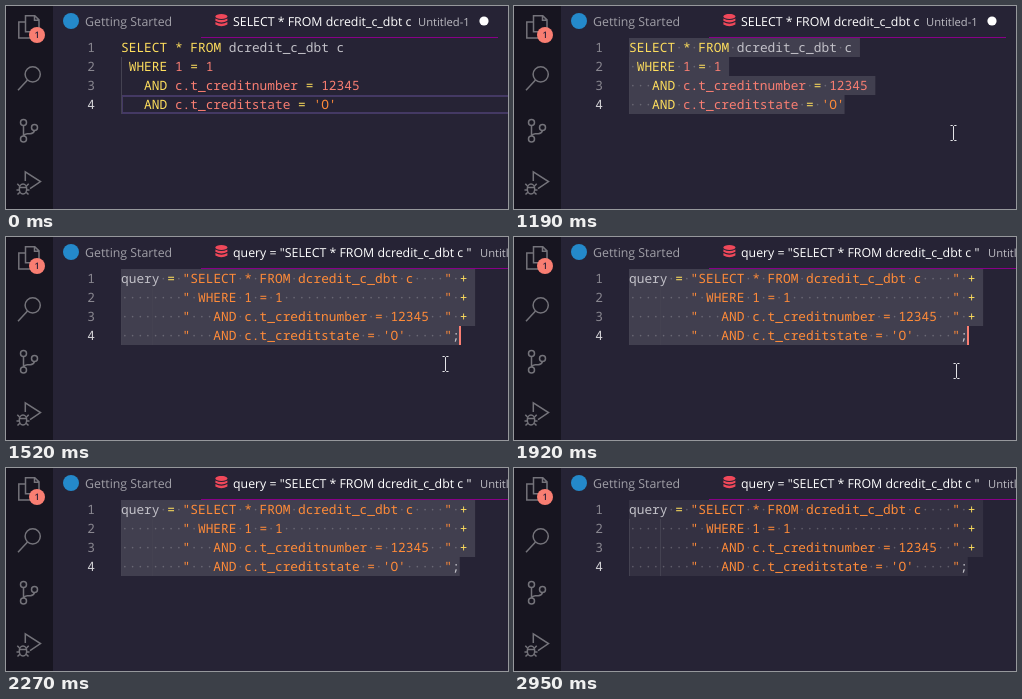
Animation, 502 px wide and 203 px high, one loop 3.08 s. Source, as an HTML page:

```html
<!DOCTYPE html>
<html lang="en">
<head>
<meta charset="utf-8">
<title>Editor</title>
<style>
  html, body { margin: 0; height: 100%; overflow: hidden; background: #262335; }
  svg { display: block; width: 502px; height: 203px; }
  text { white-space: pre; text-rendering: geometricPrecision; }
  .code text { font: 500 12.83px "Noto Sans Mono", "DejaVu Sans Mono", monospace; fill: #c2c1c8; }
  .ui text { font: 12.35px "Open Sans", "Noto Sans", sans-serif; fill: #fff; }
  .ui .small { font-size: 11.2px; font-weight: 500; fill: #bdbcc3; }
  .ui #title { font-weight: 500; }
  .code .key { fill: #fede5d; }
  .code .num { fill: #f97e72; }
  .code .str { fill: #ff8b39; }
  .code .dots { fill: #e3e4e2; fill-opacity: .25; }
  .line { fill: none; stroke: #74737a; stroke-width: 1.5; }
</style>
</head>
<body>
<svg viewBox="0 0 502 203">
  <rect width="502" height="203" fill="#262335"/>
  <rect width="47" height="203" fill="#171520"/>

  <!-- activity bar -->
  <g class="line">
    <path d="M20 9.7H28.8L33 13.9V25.7H19.5V9.7ZM28.5 9.7V14.2H33M19 16H12.8V32H26.3V26.2"/>
    <circle cx="26.7" cy="68.3" r="7.6"/>
    <path d="M21.5 74L12 84.3"/>
    <circle cx="17.5" cy="116.5" r="3"/>
    <circle cx="28.5" cy="121.5" r="3"/>
    <circle cx="17.5" cy="133" r="3"/>
    <path d="M17.5 119.5V130M28.5 124.5Q27.5 127.8 24.3 127.8H21.2Q18.6 127.8 17.7 130"/>
    <path d="M19.3 175V165.8L34.5 175.6L24 182.6"/>
    <ellipse cx="17" cy="183" rx="3.7" ry="5"/>
    <path d="M13.3 181.5H20.7M13.5 180L11.3 177.8M20.5 180L22.7 177.8M13.2 184H10.5M20.8 184H23.5M13.8 186.2L11.5 188.5M20.2 186.2L22.5 188.5"/>
  </g>
  <circle cx="31" cy="29" r="8" fill="#f97e72"/>

  <!-- tabs -->
  <g class="ui">
    <text x="31" y="32.4" text-anchor="middle" style="font-size:9px;font-weight:600;fill:#2a2139">1</text>
    <circle cx="65" cy="15" r="8" fill="#2489ca"/>
    <text x="79" y="19.6" style="fill:#a09fa7">Getting Started</text>
    <g fill="#f0485a" transform="translate(-.6 -.8)">
      <ellipse cx="216" cy="11.3" rx="6" ry="2.6"/>
      <path id="disc" d="M210 13.2Q216 16.6 222 13.2V15.6Q216 19 210 15.6Z"/>
      <use href="#disc" y="3.7"/>
    </g>
    <text id="title" x="227" y="19.6"></text>
    <text id="file" class="small" y="19.6">Untitled-1</text>
    <circle id="unsaved" cx="478" cy="15" r="4.6" fill="#fff"/>
    <rect id="underline" x="195" y="31" height="1" fill="#880088"/>
  </g>

  <g id="current" fill="none" stroke="#443964" stroke-width="2">
    <rect x="116" y="90" width="400" height="17"/>
  </g>
  <g id="numbers" class="code"></g>
  <g id="before" class="code"></g>
  <g id="after" class="code"></g>
  <rect id="caret" y="89" width="2" height="19" fill="#f97e72"/>
  <path id="mouse" d="M-3 -7.5H-1L0 -6.5L1 -7.5H3M0 -6.5V6.5M-3 7.5H-1L0 6.5L1 7.5H3"
        fill="none" stroke="#e4e4e8" stroke-width="1"/>
</svg>
<script>
const LOOP = 3080, LEFT = 115, TOP = 32, ROW = 19, CHAR = 7.698;
const $ = id => document.getElementById(id);
const show = (id, on) => $(id).style.display = on ? "" : "none";

const sql = [
  "SELECT * FROM dcredit_c_dbt c",
  " WHERE 1 = 1",
  "   AND c.t_creditnumber = 12345",
  "   AND c.t_creditstate = 'O'"
];
const query = sql.map((s, i) =>
  (i ? " ".repeat(8) : "query = ") + '"' + s.padEnd(33) + '"' + (i < 3 ? " +" : ";"));

const span = (kind, s) => `<tspan class="${kind}">${s}</tspan>`;
const paint = s => s.replace(
  /(".*"|'.')|(\b(?:SELECT|FROM|WHERE|AND)\b|[*=+])|(c\.t_\w+|\b\d+\b)/g,
  (m, str, key) => span(str ? "str" : key ? "key" : "num", m));

const textAt = (i, s, attr = `x="${LEFT}"`) =>
  `<text ${attr} y="${TOP + i * ROW + 14}">${s}</text>`;
const rowBox = (i, x, w, fill) =>
  `<rect x="${x}" y="${TOP + i * ROW}" width="${w}" height="${ROW}" fill="${fill}"/>`;

// One indent guide per four leading spaces
function guides(s, i) {
  let out = "";
  for (let c = 0; c < s.search(/\S/); c += 4)
    out += rowBox(i, LEFT + Math.round(c * CHAR), 1, "#444251");
  return out;
}

// Selection boxes, whitespace dots, indent guides and coloured code
function block(lines) {
  const boxes = lines.map((s, i) =>
    rowBox(i, LEFT, (s.length + (i < lines.length - 1)) * CHAR, "#fff"));
  const dots = lines.map((s, i) =>
    textAt(i, s.replace(/[^ ]/g, "\u00a0").replace(/ /g, "·"), `class="dots" x="${LEFT}"`));
  return `<g class="sel"><g class="boxes">${boxes.join("")}</g>${dots.join("")}</g>` +
    lines.map((s, i) => guides(s, i) + textAt(i, paint(s))).join("");
}

$("before").innerHTML = block(sql);
$("after").innerHTML = block(query);
$("numbers").innerHTML = [1, 2, 3, 4].map((n, i) =>
  textAt(i, n, `x="89" text-anchor="end" style="fill:${n == 4 ? "#d4d3d7" : "#88868f"}"`)).join("");

const beforeSel = document.querySelector("#before .sel");
const afterBoxes = document.querySelector("#after .boxes");
beforeSel.firstChild.setAttribute("opacity", .125);
const within = (t, a, b) => t >= a && t < b;

function draw() {
  const t = performance.now() % LOOP;
  const done = t >= 1520;

  show("before", !done);
  show("after", done);
  show("current", t < 730);
  show("unsaved", !done);
  beforeSel.style.display = t < 730 ? "none" : "";
  afterBoxes.setAttribute("opacity", t < 2950 ? .125 : .063);

  $("title").textContent = done ? 'query = "SELECT * FROM dcredit_c_dbt c "' : sql[0];
  $("file").setAttribute("x", done ? 474 : 412);
  $("underline").setAttribute("width", done ? 307 : 297);

  show("caret", within(t, 730, 1190) || within(t, 1520, 2030) || within(t, 2540, 2950));
  $("caret").setAttribute("x", done ? 453 : 330);

  // The pointer speeds up towards the lower right and leaves the stage
  const step = Math.max(0, Math.floor((t - 1920) / 70) + 1);
  const k = (step / 4) ** 1.5;
  show("mouse", within(t, 730, 2270));
  $("mouse").setAttribute("transform",
    `translate(${Math.round(439 + 22 * k) + .5} ${Math.round(127 + 57 * k)})`);

  requestAnimationFrame(draw);
}
draw();
</script>
</body>
</html>
```
